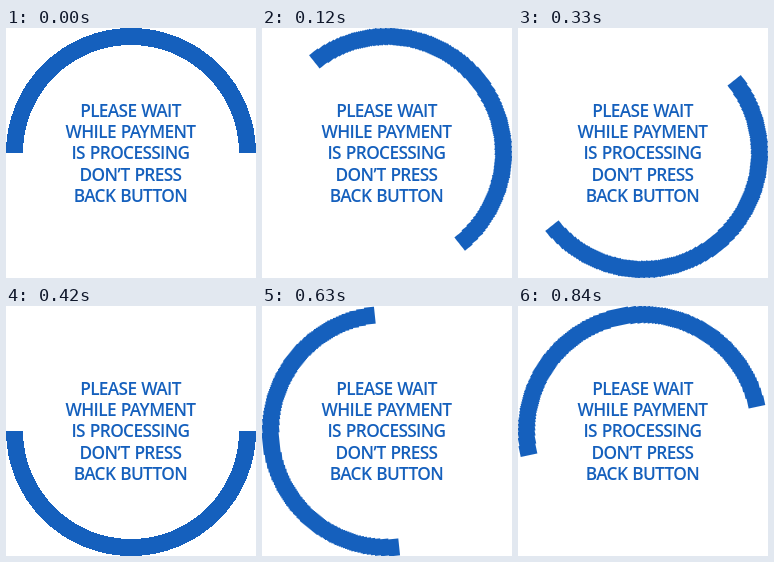
An HTML page for the animation above (0.87 s loop, 250 px wide and 250 px high).

```html
<!DOCTYPE html>
<html lang="en">
<head>
<meta charset="utf-8">
<title>Payment processing</title>
<style>
  html, body { margin: 0; width: 100%; height: 100%; overflow: hidden; background: #fff; }
  svg { display: block; width: 100%; height: 100%; }
  .arc {
    fill: none;
    stroke: #1560bd;
    stroke-width: 17px;
    shape-rendering: crispEdges;
    transform-origin: 125px 125px;
    animation: spin 870ms infinite;
  }
  text {
    fill: #1560bd;
    font: 600 17.3px "Open Sans", "Noto Sans", sans-serif;
    letter-spacing: -0.65px;
    word-spacing: 1px;
    text-anchor: middle;
  }
  /* first half turn in 14 ticks of 30 ms, second in 15 */
  @keyframes spin {
    0% { transform: rotate(0deg); animation-timing-function: steps(14); }
    48.27586% { transform: rotate(180deg); animation-timing-function: steps(15); }
    100% { transform: rotate(360deg); }
  }
</style>
</head>
<body>
<svg viewBox="0 0 250 250">
  <path class="arc" d="M8.5 125a116.5 116.5 0 0 1 233 0"/>
  <text x="124.5" y="89">PLEASE WAIT</text>
  <text x="124.5" y="110">WHILE PAYMENT</text>
  <text x="124.5" y="131">IS PROCESSING</text>
  <text x="124.5" y="153">DON’T PRESS</text>
  <text x="124.5" y="174">BACK BUTTON</text>
</svg>
</body>
</html>
```
